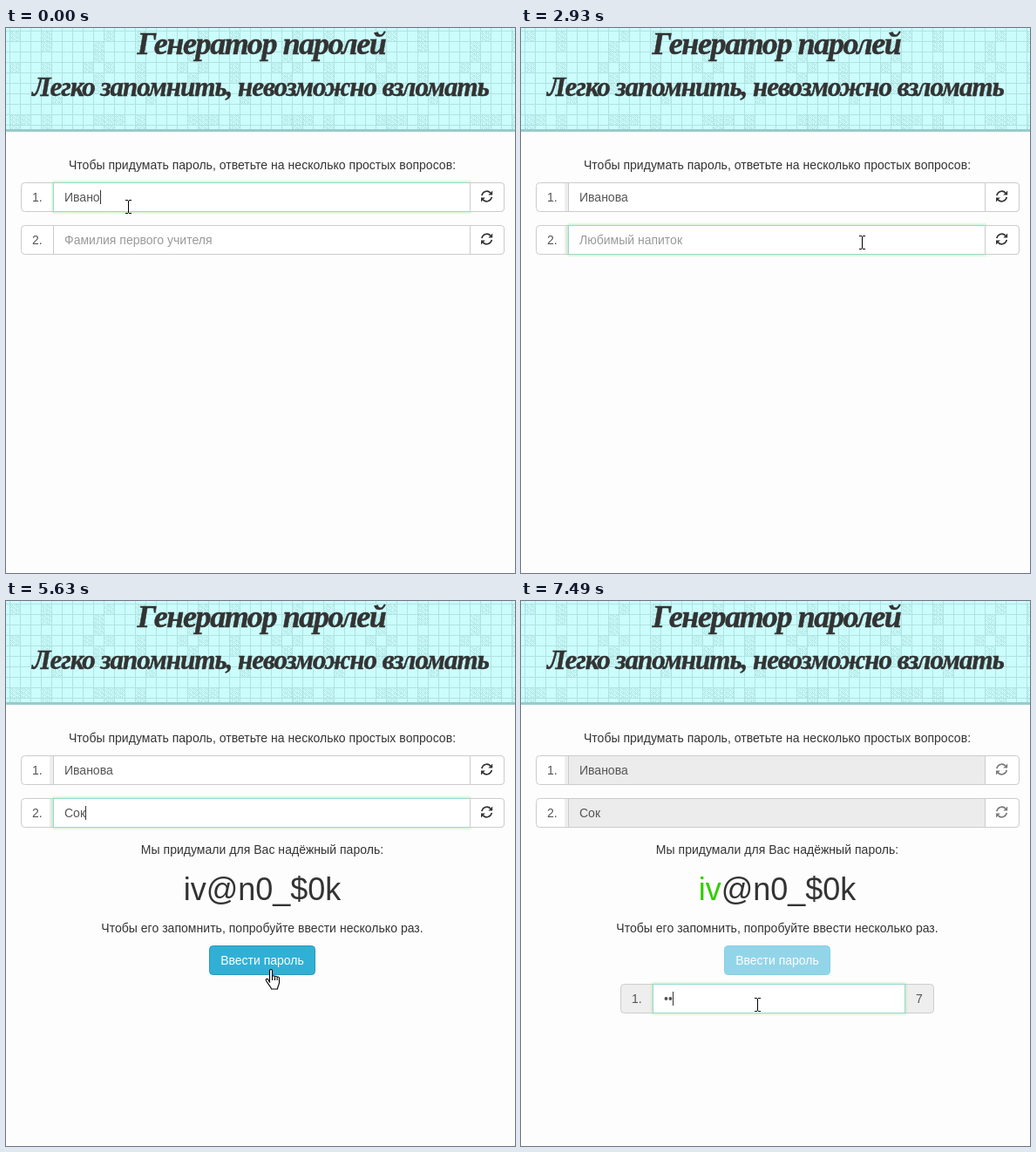
Recreate the animation shown at these times as an HTML page. Size 584 by 625 pixels, loop 8000 ms.

```html
<!DOCTYPE html>
<html lang="ru">
<head>
<meta charset="utf-8">
<title>Генератор паролей</title>
<style>
  html, body { margin: 0; width: 100%; height: 100%; overflow: hidden; background: #fdfdfd; }
  svg { display: block; }
  text { font: 14px "Liberation Sans", Arial, sans-serif; fill: #333; }
  .mid { text-anchor: middle; }
  .line { letter-spacing: .03px; }
  .head { font-family: "Liberation Serif", "Noto Serif", serif; font-weight: bold; font-style: italic; stroke: #333; stroke-width: .5; }
  .title { font-size: 36px; letter-spacing: -1.4px; }
  .subtitle { font-size: 31px; letter-spacing: -1px; }
  .field { fill: #555; }
  .pass { font-size: 36px; }
</style>
</head>
<body>
<svg id="stage" width="584" height="625" viewBox="0 0 584 625">
  <defs>
    <pattern id="grain" width="7" height="5" patternUnits="userSpaceOnUse">
      <path d="M0 .5h1m2 0h1m1 0h1M1 1.5h1m2 0h1m1 0h1M0 2.5h1m1 0h1m2 0h1M1 3.5h1m1 0h1M0 4.5h1m3 0h2" stroke="#b0e3e1"/>
    </pattern>
    <clipPath id="slide"><rect id="slideBox" x="100" y="430" width="390" height="50"/></clipPath>
  </defs>
  <rect width="584" height="116" fill="#ccfdfd"/>
  <g id="tiles"></g>
  <rect y="116" width="584" height="3" fill="#98cccb"/>
  <text class="mid head title" x="293" y="30">Генератор паролей</text>
  <text class="mid head subtitle" x="292" y="78">Легко запомнить, невозможно взломать</text>
  <text class="mid line" x="294" y="162">Чтобы придумать пароль, ответьте на несколько простых вопросов:</text>
  <g id="rows"></g>
  <text id="intro" class="mid line" x="294" y="290">Мы придумали для Вас надёжный пароль:</text>
  <g id="result">
    <text class="mid pass" x="294" y="343"><tspan id="done" fill="#3c0"></tspan><tspan id="rest"></tspan></text>
    <text class="mid line" x="294" y="380">Чтобы его запомнить, попробуйте ввести несколько раз.</text>
    <g id="button">
      <rect id="buttonBox" x="233.5" y="395.5" width="121" height="33" rx="4"/>
      <text class="mid" x="294" y="417" style="fill:#fff">Ввести пароль</text>
    </g>
  </g>
  <g id="trial" clip-path="url(#slide)"></g>
  <rect id="caret" width="1" height="16" fill="#333"/>
  <g id="pointer">
    <path id="beam" d="M0 .5h3m1 0h3M3.5 1v14M0 15.5h3m1 0h3" fill="none" stroke="#000"/>
    <path id="hand" d="M5.5 15.5V2.2c0-2.2 3-2.2 3 0V9c0-1.8 3-1.6 3 .2 .2-1.5 2.6-1.2 2.6.6 .4-1.3 2.4-1 2.4.8V15.5c0 3-2 4-2 7.5H7.5c0-2-3.5-5-6-9.5-1-2 1.2-2.8 2.4-1.3zM8.5 9v4M11.5 9.5v3.5M14.1 10v3" fill="#fff" stroke="#000" stroke-width="1.1"/>
    <g id="ban" fill="#fff" stroke="#c4080c" stroke-width="2.4">
      <circle cx="8" cy="8" r="6.7"/><path d="M3.5 3.5l9 9"/>
    </g>
  </g>
</svg>
<script>
const LOOP = 8000;
const $ = id => document.getElementById(id);
const show = (el, on) => el.setAttribute('visibility', on ? 'visible' : 'hidden');

function set(el, attrs) {
  for (const key in attrs) el.setAttribute(key, attrs[key]);
  return el;
}

function add(parent, tag, attrs, text = '') {
  const el = set(document.createElementNS('http://www.w3.org/2000/svg', tag), attrs);
  el.textContent = text;
  return parent.appendChild(el);
}

function drawTiles() {
  const cell = 12, span = 9;
  let seed = 11;
  const random = () => (seed = seed * 16807 % 2147483647) / 2147483647;
  const noisy = Array.from({ length: span * span }, () => random() < 0.2);
  let lines = '';
  for (let i = 0; i * cell < 584; i++) {
    lines += `M${i * cell + 4.5} 0V116`;
    for (let j = 0; j < 10; j++) {
      if (!noisy[(j % span) * span + i % span]) continue;
      add($('tiles'), 'rect', {
        x: i * cell + 5, y: j * cell + 4, width: cell - 1,
        height: Math.min(cell - 1, 112 - j * cell), fill: 'url(#grain)'
      });
    }
  }
  for (let y = 3.5; y < 116; y += cell) lines += `M0 ${y}H584`;
  add($('tiles'), 'path', { d: lines, fill: 'none', stroke: '#afe3e2' });
}

// A bordered input with a numbered label on its left.
function makeField(parent, box, label) {
  const { x, y, width, left, right } = box;
  const rect = (rx, w, attrs) => add(parent, 'rect',
    { x: rx + 0.5, y: y + 0.5, width: w - 1, height: 33, stroke: '#ccc', fill: '#fff', ...attrs });
  rect(x, width, { rx: 4, fill: box.fill || '#fff' });
  const strip = add(parent, 'rect', { x: left - 4, y: y + 1, width: 4, height: 32, fill: '#eee' });
  add(parent, 'text', { class: 'mid field', x: (x + left) / 2 + 0.3, y: y + 22 }, label);
  const glow = add(parent, 'g', {});
  for (const w of [6, 4, 2]) {
    add(glow, 'rect', {
      x: left + 0.5, y: y + 0.5, width: right - left - 1, height: 33, rx: 1,
      fill: 'none', stroke: '#9be38c', 'stroke-width': w, opacity: 0.15
    });
  }
  const input = rect(left, right - left, {});
  const text = add(parent, 'text', { class: 'field', x: left + 13, y: y + 22 });
  return { ...box, strip, glow, input, text };
}

function makeRow(y, label) {
  const field = makeField($('rows'), { x: 17, y, width: 555, left: 54, right: 533 }, label);
  const box = add($('rows'), 'path', { d: `M532.5 ${y + 0.5}H568a3.5 3.5 0 0 1 3.5 3.5v26a3.5 3.5 0 0 1-3.5 3.5H532.5Z` });
  const icon = add($('rows'), 'g', { transform: `translate(551.6 ${y + 16})` });
  for (const turn of [0, 180]) {
    const half = add(icon, 'g', { transform: `rotate(${turn})` });
    add(half, 'path', { d: 'M-5.7-.9A5.8 5.8 0 0 1 4.3-3.9', fill: 'none', stroke: '#333', 'stroke-width': 1.6 });
    add(half, 'path', { d: 'M6.6-6.4v4.8h-4.8z', fill: '#333' });
  }
  return { ...field, box, icon };
}

drawTiles();
const rows = [makeRow(177, '1.'), makeRow(226, '2.')];
const trial = makeField($('trial'), { x: 114, y: 439, width: 360, left: 151, right: 441, fill: '#eee' }, '1.');
const left = add($('trial'), 'text', { class: 'mid field', x: 457, y: 461 });
const fields = [...rows, trial];

const refreshLook = {
  idle: ['#fff', '#ccc', 1],
  hover: ['#e6e6e6', '#adadad', 1],
  pressed: ['#d8d8d8', '#6d97d6', 2],
  focus: ['#e6e6e6', '#6d97d6', 2],
};

const start = {
  first: 'Ивано', second: '', hint: 'Фамилия первого учителя', focus: 0, caret: true,
  pointer: ['beam', 137, 197], refresh: 'idle', strips: false, intro: false, result: false,
  word: 'iv@n0_$0', hover: false, locked: false, slide: 0, typed: 0
};

// Each step changes part of the state at its time.
const steps = [
  [270, { first: 'Иванова' }],
  [550, { pointer: ['beam', 138, 198] }],
  [820, { pointer: ['beam', 484, 228], caret: false }],
  [1070, { pointer: ['hand', 546, 249], refresh: 'hover' }],
  [1320, { focus: -1, refresh: 'pressed', hint: 'Любимый напиток', strips: true }],
  [2120, { pointer: ['beam', 388, 238], refresh: 'focus' }],
  [2370, { focus: 1, caret: true, refresh: 'idle' }],
  [2930, { caret: false }],
  [3460, { caret: true }],
  [3740, { second: 'С' }],
  [4020, { second: 'Со', intro: true }],
  [4300, { result: true }],
  [4580, { second: 'Сок', word: 'iv@n0_$0k' }],
  [4850, { pointer: ['beam', 390, 235] }],
  [5100, { pointer: ['beam', 261, 371], caret: false }],
  [5350, { pointer: ['hand', 301, 425] }],
  [5630, { pointer: ['hand', 297, 422], hover: true, caret: true }],
  [5910, { pointer: ['ban', 294, 414], hover: false, locked: true, focus: -1, slide: 12 }],
  [6180, { pointer: ['beam', 268, 455], slide: 40 }],
  [6430, { focus: 2 }],
  [7240, { typed: 1 }],
  [7490, { typed: 2 }],
];

function stateAt(time) {
  return Object.assign({}, start, ...steps.filter(s => s[0] <= time).map(s => s[1]));
}

function render(time) {
  const s = stateAt(time);
  const values = [s.first, s.second, '•'.repeat(s.typed)];

  fields.forEach((f, i) => {
    const active = s.focus === i;
    const hinted = i === 1 && !s.second;
    f.text.textContent = hinted ? s.hint : values[i];
    f.text.style.fill = hinted ? '#999' : '#555';
    show(f.glow, active);
    set(f.input, {
      stroke: active ? '#98d7d2' : '#ccc',
      fill: s.locked && i < 2 ? '#ececec' : '#fff'
    });
    show(f.strip, i < 2 && s.strips);
  });

  rows.forEach((row, i) => {
    const [fill, stroke, width] = refreshLook[i === 1 ? s.refresh : 'idle'];
    const opacity = s.locked ? 0.65 : 1;
    set(row.box, { fill, stroke, 'stroke-width': width, opacity });
    set(row.icon, { opacity });
  });

  show($('intro'), s.intro);
  show($('result'), s.result);
  $('done').textContent = s.word.slice(0, s.typed);
  $('rest').textContent = s.word.slice(s.typed);
  set($('button'), { opacity: s.locked ? 0.65 : 1 });
  set($('buttonBox'), { fill: s.hover ? '#31b0d5' : '#5bc0de', stroke: s.hover ? '#269abc' : '#46b8da' });

  show($('trial'), s.slide > 0);
  set($('slideBox'), { height: 9 + s.slide });
  left.textContent = s.word.length - s.typed;

  const field = fields[s.focus];
  show($('caret'), field && s.caret);
  if (field) {
    const width = values[s.focus] ? field.text.getComputedTextLength() : 0;
    set($('caret'), { x: Math.round(field.left + 13 + width), y: field.y + 9 });
  }

  const [kind, x, y] = s.pointer;
  for (const id of ['beam', 'hand', 'ban']) show($(id), id === kind);
  set($('pointer'), { transform: `translate(${x} ${y})` });
}

const began = performance.now();
function tick() {
  render((performance.now() - began) % LOOP);
  requestAnimationFrame(tick);
}
tick();
</script>
</body>
</html>
```
